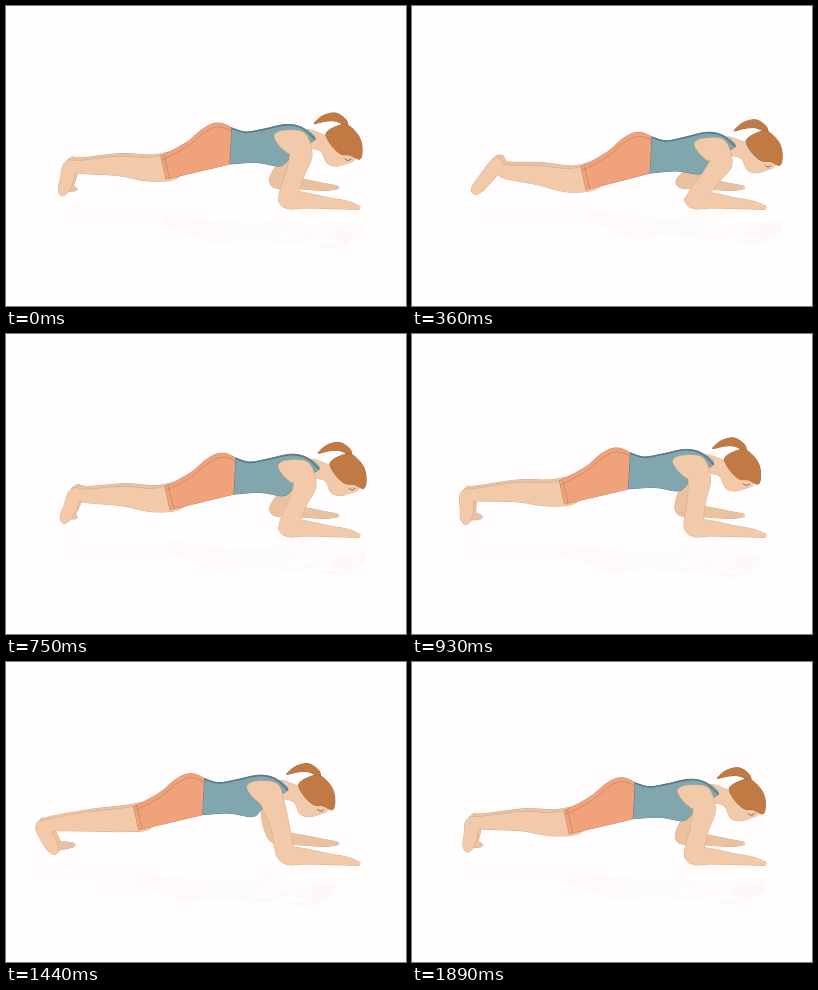
Recreate the animation shown at these times as an HTML page with a canvas. Size 400 by 300 pixels, loop 1.92 s.

```html
<!DOCTYPE html>
<html lang="en">
<head>
<meta charset="utf-8">
<title>Plank rock</title>
<style>
html, body { margin: 0; width: 100%; height: 100%; overflow: hidden; background: #fffdfe; }
canvas { display: block; width: 400px; height: 300px; }
</style>
</head>
<body>
<canvas id="stage" width="400" height="300"></canvas>
<script>
const canvas = document.getElementById('stage');
const ctx = canvas.getContext('2d');
const LOOP = 1920, STEP = 30, FLOOR = 197;
const FRONT = 420, BACK = 1410;

const SKIN = '#f2caa9', SKIN_FAR = '#eac2a0', SKIN_LINE = '#cfa68a';
const SHORTS = '#f0a27b', SHORTS_LINE = '#c47a57';
const TOP = '#82a6ae', TOP_LINE = '#587685';
const HAIR = '#c17a43', HAIR_LINE = '#9c5f35';

const parse = s => s.split(' ').map(p => p.split(',').map(Number));

// Limbs are chains of joints: x, y, radius, then how the joint follows the body
const LEG = parse('168,161,12 142,163.5,11.5 112,160,9.5,1,.31 76,161,6.5,1.05,.1,.5 64,160,5,1.35,-.17,1');
const FOOT = parse('63,160,6,1.35,-.17,1 61,173,6.5,.9,-.2,1 57,185,5,.45,-.1,1');
const TOES = parse('59,184,4,.4,-.1,1 66,186,2,.1,0,1');
const UPPER_ARM = parse('276,132,8 290,137,13 295,149,11 289,168,9,.6 281,193,8.5,.08');
const FOREARM = parse('281,194,8.5,0 300,194.5,7.5,0 320,197,5.5,0 340,199,4,0 352,201.5,2,0');
const FAR_UPPER = parse('285,155,9,.8 270,174,7,.1');
const FAR_FOREARM = parse('270,176,6,0 295,178,5,0 318,181,3.5,0 331,181.5,1.5,0');
const TAIL = parse('309,117,.7 318,112.5,3 329,111,4 338,116,3 340,123,2');

// Outlines; a doubled point is a sharp corner
const SHORTS_SHAPE = parse('155,150 155,150 171,142 184,134 194,125 206,118 216,117.5 226,122 226,122 224,158 224,158 190,166 160,173 160,173');
const TOP_SHAPE = parse('226,122 226,122 240,126 258,123 280,118.5 296,121.5 309,133 290,143 282,154 273,160 250,156.5 224,158 224,158');
const FACE = parse('300,124 318,129 345,140 349,153 339,158 330,160 321,157 315,145 302,140');
const HAIR_SHAPE = parse('320,128 329,121 341,119 352,129 356,141 354,153 344,149 335,148 326,140');

const glide = (from, to, u) => from + (to - from) * (1 - Math.cos(Math.PI * u)) / 2;

// Horizontal sway: swing to the front, glide back, return
function sway(t) {
  if (t < FRONT) return 14.5 * Math.sin(Math.PI / 2 * t / FRONT);
  if (t < BACK) return glide(14.5, -27.5, (t - FRONT) / (BACK - FRONT));
  return glide(-27.5, -2.5, (t - BACK) / (LOOP - BACK));
}

// Moves a joint for sway s; "loose" runs from 0 (body) to 1 (ground)
function place([x, y, r, kx = 1, ky = 0.49 * kx, loose = 1 - kx], s) {
  const tilt = 0.0016 * Math.max(s, 0) * (225 - x);
  const held = 1 - loose;
  return [x + kx * (s + 0.009 * loose * s * s),
    y + ky * s + held * (0.0108 * s * s + tilt), r];
}

function curve(pts, closed) {
  const path = new Path2D(), n = pts.length;
  const at = i => closed ? pts[(i + n) % n] : pts[Math.min(Math.max(i, 0), n - 1)];
  path.moveTo(pts[0][0], pts[0][1]);
  for (let i = 0; i < (closed ? n : n - 1); i++) {
    const a = at(i - 1), b = at(i), c = at(i + 1), d = at(i + 2);
    if (b[0] === c[0] && b[1] === c[1]) continue;
    path.bezierCurveTo(b[0] + (c[0] - a[0]) / 6, b[1] + (c[1] - a[1]) / 6,
      c[0] - (d[0] - b[0]) / 6, c[1] - (d[1] - b[1]) / 6, c[0], c[1]);
  }
  return path;
}

// Smooth outline around a chain of joints
function limb(joints) {
  const left = [], right = [], last = joints.length - 1;
  joints.forEach(([x, y, r], i) => {
    const a = joints[Math.max(i - 1, 0)], b = joints[Math.min(i + 1, last)];
    const len = Math.hypot(b[0] - a[0], b[1] - a[1]);
    const ux = (b[0] - a[0]) / len * r, uy = (b[1] - a[1]) / len * r;
    if (i === 0) left.push([x - ux, y - uy]);
    left.push([x + uy, y - ux]);
    right.unshift([x - uy, y + ux]);
    if (i === last) left.push([x + ux, y + uy]);
  });
  return curve([...left, ...right], true);
}

// Paints paths as one body: shared outline below, fill above
function paint(paths, fill, line) {
  ctx.strokeStyle = line;
  ctx.lineWidth = 1;
  paths.forEach(p => ctx.stroke(p));
  ctx.fillStyle = fill;
  paths.forEach(p => ctx.fill(p));
}

function draw(s) {
  const move = pts => pts.map(p => place(p, s));
  const shape = pts => curve(move(pts), true);
  const part = joints => limb(move(joints));
  const shift = (pts, dx, dy) => pts.map(([x, y]) => [x + dx, y + dy]);
  const line = (pts, color, width) => {
    ctx.strokeStyle = color;
    ctx.lineWidth = width;
    ctx.stroke(curve(move(pts), false));
  };

  ctx.clearRect(0, 0, 400, 300);
  ctx.lineJoin = ctx.lineCap = 'round';

  ctx.save();
  ctx.translate(3, -3);
  paint([LEG, FOOT, TOES].map(part), SKIN_FAR, SKIN_LINE);
  ctx.restore();
  paint([FAR_UPPER, FAR_FOREARM].map(part), SKIN_FAR, SKIN_LINE);
  paint([LEG, FOOT].map(part), SKIN, SKIN_LINE);

  paint([shape(SHORTS_SHAPE)], SHORTS, SHORTS_LINE);
  line([[158, 149], [163.5, 172]], SHORTS_LINE, 0.6);
  line(shift(SHORTS_SHAPE.slice(1, 8), 1, 4), SHORTS_LINE, 0.6);

  paint([shape(FACE)], SKIN, SKIN_LINE);
  paint([shape(TOP_SHAPE)], TOP, TOP_LINE);
  line(shift(TOP_SHAPE.slice(1, 7), 0, 0.5), TOP_LINE, 1.3);
  paint([part(TAIL)], HAIR, HAIR_LINE);
  paint([shape(HAIR_SHAPE)], HAIR, HAIR_LINE);
  line([[339, 153], [342, 154.5], [345, 153]], '#6d4a38', 0.8);
  paint([UPPER_ARM, FOREARM].map(part), SKIN, SKIN_LINE);

  // Faint floor reflection
  ctx.save();
  ctx.globalCompositeOperation = 'destination-over';
  ctx.globalAlpha = 0.035;
  ctx.translate(0, FLOOR);
  ctx.scale(1, -0.5);
  ctx.drawImage(canvas, 0, 0, 400, FLOOR, 0, -FLOOR, 400, FLOOR);
  ctx.restore();
}

const start = performance.now();
function tick() {
  const t = (performance.now() - start) % LOOP;
  draw(sway(Math.floor(t / STEP) * STEP));
  requestAnimationFrame(tick);
}
tick();
</script>
</body>
</html>
```
